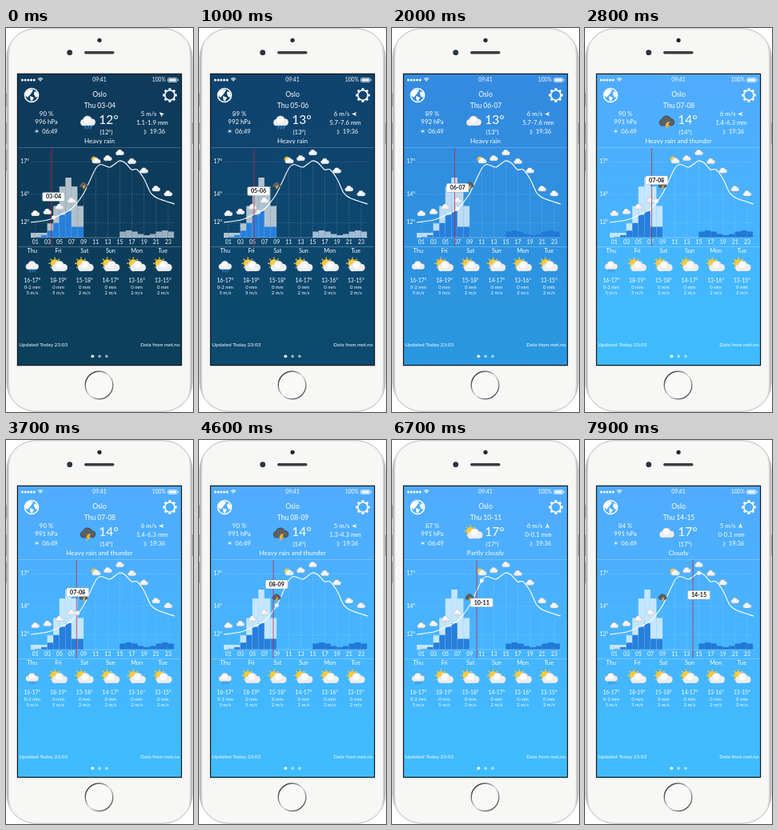
Recreate the animation shown at these times as an HTML page with a canvas. Size 234 by 480 pixels, loop 8 s.

```html
<!DOCTYPE html>
<html lang="en">
<head>
<meta charset="utf-8">
<title>Weather</title>
<style>
html, body { margin: 0; width: 100%; height: 100%; overflow: hidden; background: #fff; }
canvas { display: block; width: 234px; height: 480px; }
</style>
</head>
<body>
<canvas id="stage"></canvas>
<script>
const W = 234, H = 480, LOOP = 8000;
const canvas = document.getElementById('stage');
const ratio = window.devicePixelRatio || 1;
canvas.width = W * ratio;
canvas.height = H * ratio;
const ctx = canvas.getContext('2d');
const FONT = 'Lato, "Open Sans", sans-serif';

// Chart geometry: one slot per hour
const LEFT = 29, STEP = 7.55, BASE = 262;
const slotX = h => LEFT + h * STEP;
const hourX = h => slotX(h) + 7.8;

// Temperature curve through a few points
const curve = [[31, 243], [52, 240], [67, 234], [82, 226], [97, 207], [112, 176], [119, 170.5],
  [130, 174], [142, 166], [149, 168.5], [157, 177], [164, 177], [173, 189], [181, 206], [190, 213], [211, 220]];

// Rain bars: a morning bell, then light ripples in the evening
const bell = (h, w) => Math.exp(-(((h - 6) / w) ** 2));
const rainMax = h => h < 9 ? Math.max(6, 75 * bell(h, 2.5)) : h > 14 ? 6 + 3 * Math.cos((h - 16) * Math.PI / 3) : 0;
const rainMin = h => h < 7 ? 33 * bell(h, 2.6) : h < 9 ? 13.5 : 0;

// Each report holds from its hour until the next one
const reports = [
  { from: 3, hum: 90, press: 996, temp: 12, wind: 5, turn: 0.7, rain: '1.1-1.9', sky: 'Heavy rain', kind: 'rain' },
  { from: 5, hum: 89, press: 992, temp: 13, wind: 6, turn: 0, rain: '5.7-7.6', sky: 'Heavy rain', kind: 'rain' },
  { from: 7, hum: 90, press: 991, temp: 14, wind: 6, turn: 0, rain: '1.4-6.3', sky: 'Heavy rain and thunder', kind: 'thunder' },
  { from: 8, hum: 90, press: 991, temp: 14, wind: 5, turn: 0, rain: '1.3-4.3', sky: 'Heavy rain and thunder', kind: 'thunder' },
  { from: 9, hum: 87, press: 991, temp: 17, wind: 6, turn: 1.57, rain: '0-0.1', sky: 'Partly cloudy', kind: 'sun' },
  { from: 12, hum: 84, press: 991, temp: 17, wind: 5, turn: 1.57, rain: '0-0.1', sky: 'Cloudy', kind: 'cloud' }
];

const days = ['Thu 16-17 0-2 5', 'Fri 18-19 0 5', 'Sat 15-18 0 2', 'Sun 14-17 0 2', 'Mon 13-16 0 2', 'Tue 13-15 0 2'];

// Time keys
const cursorKeys = [[0, 57], [1600, 76], [2800, 83.5], [4600, 93], [6700, 106], [7900, 135], [8000, 137]];
const skyKeys = [[0, [14, 58, 92]], [1000, [15, 67, 110]], [1600, [22, 88, 146]], [2000, [52, 138, 224]], [2800, [80, 171, 255]]];
const lowBarKeys = [[0, [154, 174, 192]], [1600, [163, 195, 224]], [1900, [32, 121, 214]]];

function mix(a, b, k) {
  return Array.isArray(a) ? a.map((v, i) => mix(v, b[i], k)) : a + (b - a) * k;
}

function keyed(keys, t) {
  for (let i = 1; i < keys.length; i++) {
    const [t0, a] = keys[i - 1], [t1, b] = keys[i];
    if (t < t1) return mix(a, b, (t - t0) / (t1 - t0));
  }
  return keys[keys.length - 1][1];
}

const curveY = x => keyed(curve, x);
const rgb = c => `rgb(${c.map(Math.round).join(',')})`;
const white = a => `rgba(255,255,255,${a})`;
const pad = n => String(n).padStart(2, '0');

function gradient(x0, y0, x1, y1, stops) {
  const g = ctx.createLinearGradient(x0, y0, x1, y1);
  stops.forEach(([at, color]) => g.addColorStop(at, color));
  return g;
}

function text(s, x, y, size, align = 'center', color = '#fff', weight = 400) {
  ctx.font = `${weight} ${size}px ${FONT}`;
  ctx.textAlign = align;
  ctx.textBaseline = 'middle';
  ctx.fillStyle = color;
  ctx.fillText(s, x, y);
}

function paint(fill, stroke, width = 1) {
  if (fill) { ctx.fillStyle = fill; ctx.fill(); }
  if (stroke) { ctx.strokeStyle = stroke; ctx.lineWidth = width; ctx.stroke(); }
}

function box(x, y, w, h, r, fill, stroke, width) {
  ctx.beginPath();
  ctx.roundRect(x, y, w, h, r);
  paint(fill, stroke, width);
}

function disc(x, y, r, fill, stroke, width) {
  ctx.beginPath();
  ctx.arc(x, y, r, 0, 7);
  paint(fill, stroke, width);
}

function line(x0, y0, x1, y1, stroke, width = 1, dash = []) {
  ctx.beginPath();
  ctx.setLineDash(dash);
  ctx.moveTo(x0, y0);
  ctx.lineTo(x1, y1);
  paint(null, stroke, width);
  ctx.setLineDash([]);
}

function poly(points, fill) {
  ctx.beginPath();
  points.forEach(p => ctx.lineTo(p[0], p[1]));
  ctx.closePath();
  paint(fill);
}

function at(x, y, scale, turn, draw) {
  ctx.save();
  ctx.translate(x, y);
  ctx.scale(scale, scale);
  ctx.rotate(turn);
  draw();
  ctx.restore();
}

// Calls draw(cos, sin) for eight directions
function rays(draw) {
  for (let a = 0; a < 8; a++) draw(Math.cos(a * Math.PI / 4), Math.sin(a * Math.PI / 4));
}

function cloudShape(grow, fill) {
  disc(-5, 1.5, 3.7 + grow, fill);
  disc(-0.5, -1.2, 5 + grow, fill);
  disc(4.8, 1.2, 3.8 + grow, fill);
  box(-5 - grow, 0, 10 + 2 * grow, 5 + grow, 2, fill);
}

function icon(kind, x, y, scale) {
  at(x, y, scale, 0, () => {
    const dark = kind === 'thunder', sunny = kind === 'sun';
    if (sunny) {
      rays((c, s) => line(-4 + c * 5.4, -2.5 + s * 5.4, -4 + c * 7.2, -2.5 + s * 7.2, '#f8cb45', 1.3));
      disc(-4, -2.5, 5, '#fcca35');
      ctx.translate(1.5, 1);
    }
    cloudShape(0.5, dark ? '#30343a' : sunny ? '#d5d9de' : '#a3a7ad');
    cloudShape(0, dark ? '#5b6067' : '#eceef0');
    if (!dark) disc(-1, -1.8, 3.7, '#fcfcfc');
    if (kind === 'rain') {
      for (const dx of [-3, 0.3, 3.6]) line(dx + 1, 5.5, dx - 0.8, 9.3, '#3588e0', 1.2);
    }
    if (dark) {
      poly([[0, 1], [3.5, 1], [1.4, 4.4], [3.4, 4.4], [-1.8, 10.5], [-0.3, 5.8], [-2.3, 5.8]], '#f9b52c');
    }
  });
}

function globe(x, y) {
  disc(x, y, 8.5, null, '#fff', 1.6);
  at(x, y, 1, 0, () => {
    poly([[-7, -4], [-3, -7.5], [2, -7], [1, -4.5], [-2, -0.5], [-5, 3], [-8, 0]], '#fff');
    poly([[-2, 1], [3, 3], [0.5, 7.5], [-1.5, 6]], '#fff');
    poly([[3.5, -5], [7, -3.5], [8, 1], [5.5, 3], [3, -1]], '#fff');
  });
}

function gear(x, y) {
  rays((c, s) => line(x + c * 6.3, y + s * 6.3, x + c * 8.8, y + s * 8.8, '#fff', 3));
  disc(x, y, 6.2, null, '#fff', 1.6);
}

function phone() {
  ctx.fillStyle = '#fff';
  ctx.fillRect(0, 0, W, H);
  for (const [y, h] of [[81, 17], [118, 27], [152, 27]]) box(0, y, 3, h, 1, '#9a9c9f');
  box(231, 118, 3, 27, 1, '#9a9c9f');
  const rim = gradient(0, 0, W, 0, [[0, '#a2a5a8'], [0.025, '#f4f5f3'], [0.975, '#f4f5f3'], [1, '#a2a5a8']]);
  box(1, 0.7, 232, 478.6, 36, rim, '#a9abae', 0.8);
  box(4, 3, 226, 474, 33, '#f7f8f6');
  disc(117, 15.3, 2.6, '#222529');
  disc(79.7, 30.7, 3.4, '#2c3440');
  box(98, 29, 37.5, 3.4, 1.7, '#3a3c3f');
  const metal = gradient(104, 435, 129, 460, [[0, '#3c3e40'], [0.5, '#d9dadb'], [1, '#4a4c4e']]);
  disc(116.5, 446.5, 17.3, '#f9faf8', metal, 1.4);
}

function screen(t) {
  const top = keyed(skyKeys, t), [r, g, b] = top;
  box(14.5, 57.5, 205, 364, 0, null, '#10151a', 1.4);
  ctx.fillStyle = gradient(0, 58, 0, 421, [[0, rgb(top)], [1, rgb([r * 0.78, g * 1.1, b])]]);
  ctx.fillRect(15, 58, 204, 363);
}

function statusBar() {
  for (let i = 0; i < 5; i++) disc(20.4 + i * 3.7, 65, 1.5, '#fff');
  for (const r of [1.6, 3.2, 4.8]) {
    ctx.beginPath();
    ctx.arc(43, 67.3, r, -2.3, -0.84);
    paint(null, '#fff', 1);
  }
  text('09:41', 117, 65, 6.8);
  text('100%', 200, 65, 6.8, 'right');
  box(202.5, 62.5, 11.5, 5, 1, null, '#fff', 0.7);
  box(203.5, 63.5, 9.5, 3, 0.4, '#fff');
  box(214.8, 64, 1, 2, 0.4, '#fff');
}

function header(h) {
  const now = reports.filter(r => r.from <= h).pop();
  globe(32, 84);
  gear(205, 84);
  text('Oslo', 117, 83, 8.7);
  text(`Thu ${pad(h)}-${pad(h + 1)}`, 117.5, 97, 8.5);
  text(`${now.hum} %`, 50.5, 107.5, 7.8);
  text(`${now.press} hPa`, 50.5, 118, 7.8);
  text('06:49', 55, 129.3, 7.6);
  disc(38.5, 129, 1.3, '#fff');
  rays((c, s) => disc(38.5 + c * 2.4, 129 + s * 2.4, 0.4, '#fff'));
  text(`${now.wind} m/s`, 178.5, 107.5, 7.8);
  at(194.5, 107.5, 1, now.turn, () => poly([[-3.5, 0], [3, -2.6], [1.2, 0], [3, 2.6]], '#fff'));
  text(`${now.rain} mm`, 183, 118.5, 7.8);
  text('19:36', 189.5, 130, 7.6);
  ctx.beginPath();
  ctx.arc(172.8, 130, 2.6, -1.5, 1.5);
  ctx.quadraticCurveTo(175, 130, 173, 127.4);
  paint(null, white(0.85), 0.6);
  icon(now.kind, 102.5, 116.5, 1.05);
  text(`${now.temp}°`, 128.5, 115, 15.5);
  text(`(${now.temp}°)`, 125.5, 130.8, 7.6);
  text(now.sky, 117, 141.3, 8.1);
}

// Smooth stroke that passes through every point
function strokeCurve() {
  ctx.beginPath();
  ctx.moveTo(...curve[0]);
  for (let i = 1; i < curve.length; i++) {
    const a = curve[i - 1], b = curve[i];
    const before = curve[i - 2] || a, after = curve[i + 1] || b;
    ctx.bezierCurveTo(a[0] + (b[0] - before[0]) / 8, a[1] + (b[1] - before[1]) / 8,
      b[0] - (after[0] - a[0]) / 8, b[1] - (after[1] - a[1]) / 8, b[0], b[1]);
  }
  paint(null, '#fff', 1.1);
}

function bars(t) {
  const low = rgb(keyed(lowBarKeys, t));
  for (let h = 0; h < 24; h++) {
    const x = Math.max(31, slotX(h)), w = slotX(h + 1) - x;
    const bar = (v, fill) => { ctx.fillStyle = fill; ctx.fillRect(x, BASE - v, w, v); };
    bar(rainMax(h), h > 14 ? low : white(0.68));
    bar(rainMin(h), '#267fdc');
  }
}

function chart(t, h, cursor) {
  line(15, 149.5, 219, 149.5, white(0.3), 0.7);
  line(15, 273.5, 219, 273.5, white(0.35), 0.7);
  for (const [s, y] of [['17°', 167], ['14°', 207.5], ['12°', 243]]) {
    line(31, y + 0.5, 211, y + 0.5, white(0.28), 0.6, [1.5, 1.5]);
    text(s, 29, y, 6.9, 'right');
  }
  for (let i = 0; i < 24; i += 2) line(hourX(i), curveY(hourX(i)), hourX(i), BASE, white(0.3), 0.6, [2, 1.5]);
  bars(t);
  line(31, BASE, 211, BASE, white(0.5), 0.6);
  strokeCurve();

  for (let i = 0; i < 24; i += 2) {
    const x = hourX(i);
    const kind = i === 8 ? 'thunder' : i === 10 ? 'sun' : 'cloud';
    icon(kind, x, curveY(x) - 10.3, 0.58);
    text(pad(i + 1), x, 267.5, 6.9);
  }

  line(cursor, 150, cursor, 273, 'rgba(206,30,56,.75)', 1);
  const x = hourX(h), y = curveY(x);
  disc(x, y, 2.5, '#fff');
  const top = y < 198 ? y + 22 : y - 31.5;
  box(x - 14, top, 28, 11, 1.5, '#fff', 'rgba(40,60,80,.35)', 0.6);
  text(`${pad(h)}-${pad(h + 1)}`, x, top + 5.7, 7.1, 'center', '#111', 700);
}

function forecast() {
  days.forEach((row, i) => {
    const [day, temp, rain, wind] = row.split(' ');
    const x = 32.8 + i * 32.7;
    text(day, x, 279, 7.3);
    icon(i ? 'sun' : 'rain', x, 297, i ? 1.08 : 0.9);
    text(temp + '°', x, 316, 6.7);
    text(rain + ' mm', x, 324, 5.9);
    text(wind + ' m/s', x, 331.3, 5.9);
  });
  text('Updated Today 23:03', 16.3, 396, 6.45, 'left');
  text('Data from met.no', 217.5, 396, 6.35, 'right');
  for (let i = 0; i < 3; i++) disc(108.3 + i * 8.8, 410.3, 1.9, white(i ? 0.55 : 1));
}

function draw(t) {
  ctx.setTransform(ratio, 0, 0, ratio, 0, 0);
  const cursor = keyed(cursorKeys, t);
  const h = Math.floor((cursor - LEFT) / STEP);
  phone();
  screen(t);
  statusBar();
  header(h);
  chart(t, h, cursor);
  forecast();
}

const start = performance.now();
function tick() {
  draw((performance.now() - start) % LOOP);
  requestAnimationFrame(tick);
}
tick();
</script>
</body>
</html>
```
